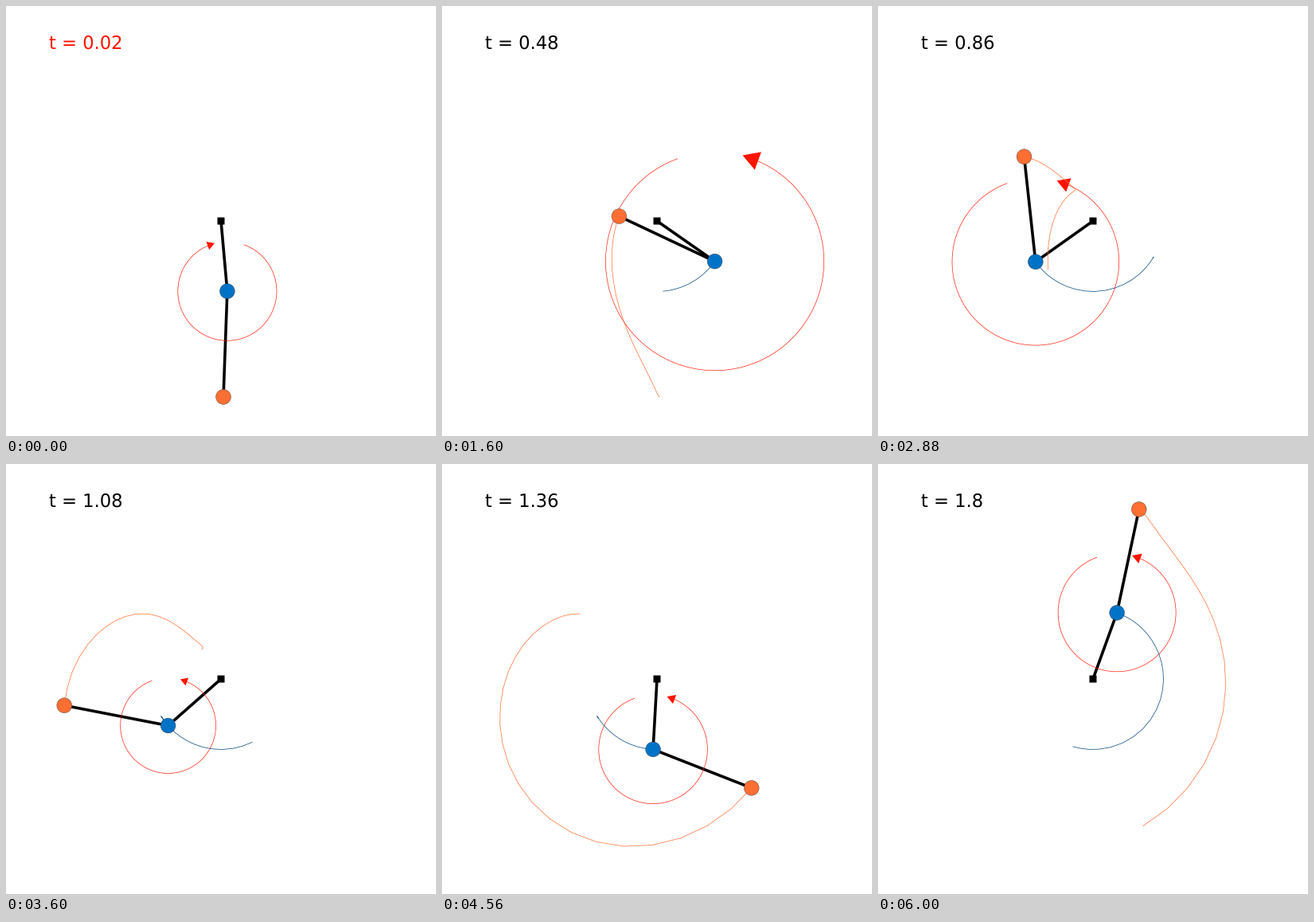
Write a matplotlib script that moves like this. It is 540 px wide and 540 px high and loops after 6080 ms.

```python
import numpy as np
import matplotlib.pyplot as plt
from matplotlib.animation import FuncAnimation
from matplotlib.patches import Circle, Polygon, Rectangle

SIZE, FRAMES, INTERVAL = 540, 76, 80
DT, STEPS, TAIL = 0.02, 90, 24
CENTER = np.array([270.0, 270.0])
L1, L2 = 88.5, 132.8
MIN_RADIUS = 48.5
BLUE, ORANGE, RED = "#0072c6", "#ff6f33", "#ff1400"

# key poses: time, upper angle, lower angle (degrees from straight down)
KEYS = np.array([
    (0.02, 5.1, -2.1), (0.30, 52.5, -58), (0.40, 59.2, -90),
    (0.60, 26.3, -151.5), (0.68, -7.1, -173.2), (0.88, -56.5, -170),
    (1.08, -48.6, -101), (1.20, -37, -37.7), (1.36, -3.2, 68.6),
    (1.48, 55, 139), (1.60, 104, 171.8), (1.80, 160.1, 168),
])

# elbow torque pulses: time, height (positive is clockwise), width
PULSES = [(0.13, 84, 0.20), (0.445, -142, 0.125), (0.85, -105, 0.24),
          (1.255, -151, 0.12), (1.51, 104, 0.08), (1.80, -74, 0.12)]


def spline(x, xs, ys):
    """Natural cubic spline through the columns of ys."""
    h = np.diff(xs)
    slope = np.diff(ys, axis=0) / h[:, None]
    system, rhs = np.eye(len(xs)), np.zeros_like(ys)
    for i in range(1, len(xs) - 1):
        system[i, i - 1:i + 2] = h[i - 1], 2 * (h[i - 1] + h[i]), h[i]
        rhs[i] = 6 * (slope[i] - slope[i - 1])
    bend = np.linalg.solve(system, rhs)
    i = np.clip(np.searchsorted(xs, x, side="right") - 1, 0, len(h) - 1)
    step = h[i][:, None]
    b = (x - xs[i])[:, None] / step
    a = 1 - b
    return (a * ys[i] + b * ys[i + 1]
            + ((a**3 - a) * bend[i] + (b**3 - b) * bend[i + 1]) * step**2 / 6)


def swing(angle):
    return np.stack([np.sin(angle), np.cos(angle)], axis=-1)


def polar(angle):
    """Unit vector on screen, counter-clockwise from the right."""
    return np.stack([np.cos(angle), -np.sin(angle)], axis=-1)


times = DT * np.arange(1, STEPS + 1)
upper, lower = np.radians(spline(times, KEYS[:, 0], KEYS[:, 1:])).T
elbow = CENTER + L1 * swing(upper)
tip = elbow + L2 * swing(lower)
torque = sum(h * np.exp(-((times - c) / w) ** 2) for c, h, w in PULSES)

plt.rcParams["text.hinting"] = "none"
fig = plt.figure(figsize=(SIZE / 72, SIZE / 72), dpi=72, facecolor="white")
ax = fig.add_axes([0, 0, 1, 1])
ax.set(xlim=(0, SIZE), ylim=(SIZE, 0))
ax.axis("off")


def line(color, width, z):
    return ax.plot([], [], color=color, lw=width, zorder=z)[0]


def disk(color):
    return ax.add_patch(Circle(CENTER, 9.4, fc=color, ec="#333333",
                               lw=0.4, zorder=6))


label = ax.text(53.6, 54, "", fontsize=22.6, family="DejaVu Sans",
                va="baseline")
links = line("black", 3.6, 2)
ax.add_patch(Rectangle(CENTER - 4.5, 9, 9, color="black", lw=0, zorder=3,
                       snap=False))
arc = line(RED, 0.65, 4)
head = ax.add_patch(Polygon(np.zeros((3, 2)), color=RED, lw=0, zorder=4))
tip_trail = line(ORANGE, 0.7, 5)
elbow_trail = line("#00447f", 0.7, 5)
elbow_disk, tip_disk = disk(BLUE), disk(ORANGE)


def draw_torque(center, value):
    r = max(MIN_RADIUS, abs(value))
    side = -1 if value > 0 else 1
    sweep = np.radians(np.linspace(110, 430, 121))
    arc.set_data(*(center + r * polar(sweep)).T)
    # arrowhead lies along the tangent at the open end
    mid = center + r * np.array([side, 1]) * polar(np.radians(71))
    along = np.array([-side, 1]) * polar(np.radians(20))
    across = np.array([-along[1], along[0]])
    base = mid - 0.075 * r * along
    head.set_xy([mid + 0.075 * r * along,
                 base + 0.087 * r * across,
                 base - 0.087 * r * across])


def update(n):
    i = n * (STEPS - 1) // (FRAMES - 1)
    recent = slice(max(0, i - TAIL), i + 1)
    label.set_text(f"t = {round(times[i], 2)}")
    label.set_color(RED if i == 0 else "black")
    links.set_data(*np.array([CENTER, elbow[i], tip[i]]).T)
    draw_torque(elbow[i], torque[i])
    tip_trail.set_data(*tip[recent].T)
    elbow_trail.set_data(*elbow[recent].T)
    elbow_disk.center, tip_disk.center = elbow[i], tip[i]
    return (label, links, arc, head, tip_trail, elbow_trail,
            elbow_disk, tip_disk)


anim = FuncAnimation(fig, update, frames=FRAMES, interval=INTERVAL,
                     repeat=True, repeat_delay=0)
plt.show()
```
